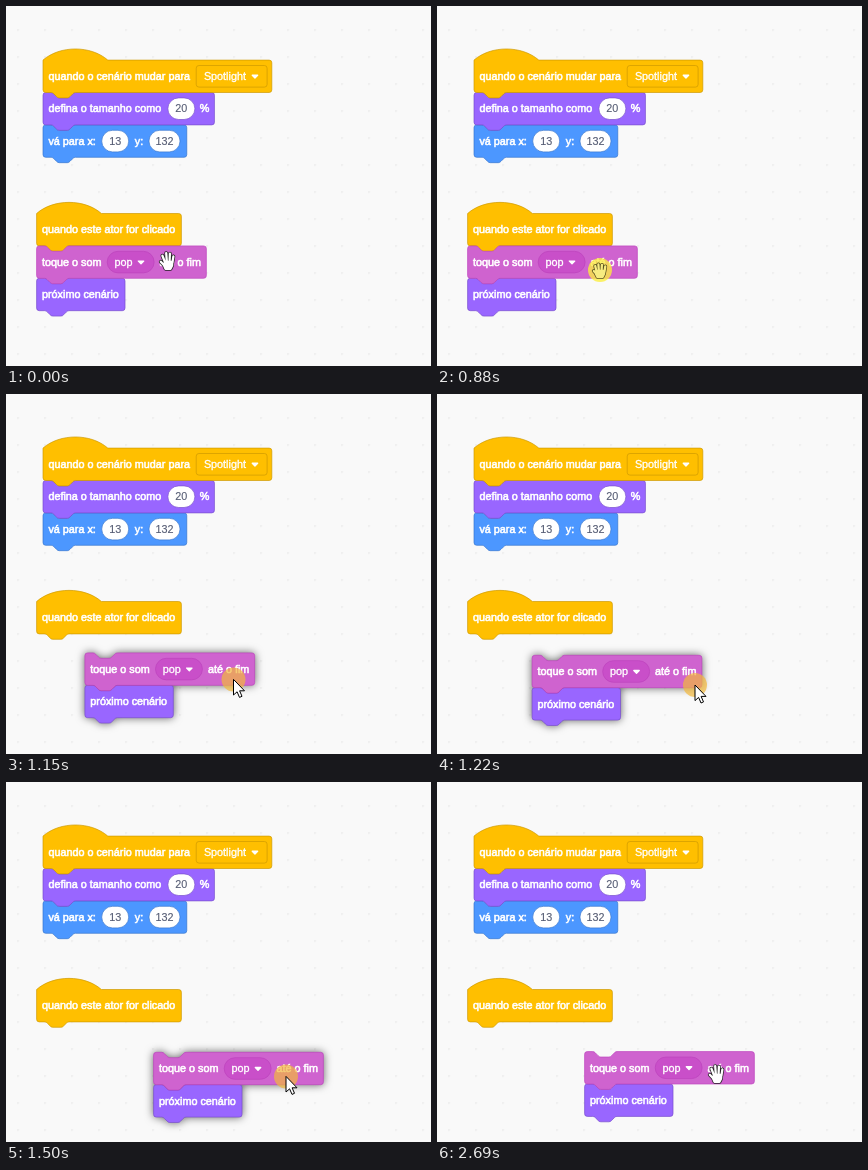
Animation, 425 px wide and 360 px high, one loop 3.55 s. Source, as an HTML page:

```html
<!DOCTYPE html>
<html lang="pt">
<head>
<meta charset="utf-8">
<title>Blocos</title>
<style>
  html, body { margin: 0; width: 100%; height: 100%; overflow: hidden; background: #f9f9f9; }
  svg { display: block; width: 425px; height: 360px; }
  text { font: 16px "Liberation Sans", Arial, sans-serif; fill: #fff; stroke: #fff; stroke-width: .9px; white-space: pre; }
  text.choice { stroke-width: .5px; }
  text.value { fill: #575e75; stroke: #575e75; stroke-width: .2px; text-anchor: middle; }
  .lifted { filter: drop-shadow(0 0 4px rgba(0, 0, 0, .6)); }
</style>
</head>
<body>
<svg viewBox="0 0 425 360">
  <defs>
    <pattern id="grid" x="11.3" y="23.3" width="27" height="27" patternUnits="userSpaceOnUse">
      <rect width="1.4" height="1.4" fill="#e4e4e4"/>
    </pattern>
  </defs>
  <rect width="425" height="360" fill="#f9f9f9"/>
  <rect width="425" height="360" fill="url(#grid)"/>
  <g id="fixed"></g>
  <g id="ghost" opacity=".28"></g>
  <g id="stack"></g>
  <circle id="halo" r="12"/>
  <g id="pointer">
    <path id="arrow" d="M0 0V15.6L3.6 12.4L6 18L8.5 16.9L6.1 11.4H11Z" fill="#fff" stroke="#000"/>
    <g id="open"></g>
    <g id="fist"></g>
  </g>
</svg>
<script>
const SCALE = 0.675, ROW = 48, LOOP = 3550;
const $ = id => document.getElementById(id);

const COLORS = {
  event: ['#ffbf00', '#cc9900', '#ffbf00'],
  looks: ['#9966ff', '#774dcb', '#855cd6'],
  motion: ['#4c97ff', '#3373cc', '#4280d7'],
  sound: ['#cf63cf', '#bd42bd', '#c94fc9']
};

// Block parts, in block units
const label = (x, s, style = '') => `<text class="${style}" x="${x}" y="29.6">${s}</text>`;
const box = (x, w, r, fill, stroke) =>
  `<rect x="${x}" y="8" width="${w}" height="32" rx="${r}" fill="${fill}" stroke="${stroke}"/>`;
const value = (x, w, s, kind) => box(x, w, 16, '#fff', COLORS[kind][1]) +
  label(x + w / 2, s, 'value');
const menu = (x, w, r, s, textX, arrowX, kind) => box(x, w, r, COLORS[kind][2], COLORS[kind][1]) +
  label(textX, s, 'choice') +
  `<path d="M${arrowX - 4} 22.5h8l-4 4z" fill="#fff" stroke="#fff" stroke-width="2" stroke-linejoin="round"/>`;

function outline(width, hat) {
  const top = hat
    ? 'M0 0c25-22 71-22 96 0'
    : 'M0 4A4 4 0 0 1 4 0H12c2 0 3 1 4 2l4 4c1 1 2 2 4 2h12c2 0 3-1 4-2l4-4c1-1 2-2 4-2';
  return `${top}H${width - 4}a4 4 0 0 1 4 4v40a4 4 0 0 1-4 4H48c-2 0-3 1-4 2l-4 4c-1 1-2 2-4 2` +
    'h-12c-2 0-3-1-4-2l-4-4c-1-1-2-2-4-2H4a4 4 0 0 1-4-4z';
}

function block(row, kind, width, parts, hat) {
  const [fill, stroke] = COLORS[kind];
  return `<g transform="translate(0 ${row * ROW})">` +
    `<path d="${outline(width, hat)}" fill="${fill}" stroke="${stroke}"/>${parts}</g>`;
}

const place = (x, y) => `translate(${x} ${y}) scale(${SCALE})`;
// Later rows go first so each tab overlaps the block below it
const script = (x, y, ...blocks) =>
  `<g transform="${place(x, y)}">${blocks.reverse().join('')}</g>`;

const HOME = { x: 30.6, y: 239.9 };
const SOUND_WIDTH = 251.5;

$('fixed').innerHTML =
  script(37, 54.1,
    block(0, 'event', 339, label(8, 'quando o cenário mudar para') +
      menu(227, 105, 4, 'Spotlight', 238.4, 314, 'event'), true),
    block(1, 'looks', 254, label(8, 'defina o tamanho como') +
      value(185, 40, '20', 'looks') + label(232.4, '%')),
    block(2, 'motion', 213, label(8, 'vá para x:') + value(87, 40, '13', 'motion') +
      label(136, 'y:') + value(157, 46, '132', 'motion'))) +
  script(HOME.x, HOME.y - ROW * SCALE,
    block(0, 'event', 214.5, label(8, 'quando este ator for clicado'), true));

$('ghost').innerHTML =
  `<path transform="${place(HOME.x, HOME.y)}" d="${outline(SOUND_WIDTH)}"/>`;

const soundBlock = block(0, 'sound', SOUND_WIDTH, label(8, 'toque o som') +
  menu(104.6, 69.5, 16, 'pop', 115.4, 154.7, 'sound') + label(182.2, 'até o fim'));
const nextBlock = block(1, 'looks', 131, label(8, 'próximo cenário'));
$('stack').innerHTML = script(0, 0, soundBlock, nextBlock);

function hand(fingers, palm, fill, edge) {
  const d = fingers + palm;
  const layer = (color, width) =>
    `<path d="${d}" fill="${color}" stroke="${color}" stroke-width="${width}" stroke-linecap="round" stroke-linejoin="round"/>`;
  return layer(edge, 3.8) + layer(fill, 2.3);
}
$('open').innerHTML = hand(
  'M-5.6-6L-3.2 0M-1.8-8.6L-1.2-1M1.9-8.2L1.6-1M5.4-5.5L4.4 1M-7.2 0L-3.5 4',
  'M-3 0L4.4 0L4 4L2.5 7H-2.5L-4 3.5Z', '#fff', '#222');
$('fist').innerHTML = hand(
  'M-4.8-4L-3.6 1M-1.6-5.5L-1.2 0M1.9-5.2L1.6 0M5.3-3.5L4.4 2M-6.2 1L-3.5 4',
  'M-3 1L4.4 1L4 4L2.5 7H-2.5L-4 4Z', '#f7ec80', '#57501c');

// time, pointer offset from the grab point, pointer shape, halo colour
const YELLOW = 'rgba(251, 238, 60, .78)', ORANGE = 'rgba(242, 184, 60, .7)', NONE = 'none';
const GRAB = { x: 163, y: 264 };
const STEPS = [
  [0, -1, -6.6, 'open', NONE],
  [70, -.8, -5.6],
  [140, -.5, -3.3],
  [210, -.2, -1.2],
  [280, 0, 0],
  [880, 0, 0, 'fist', YELLOW],
  [1010, 6, 3.1],
  [1080, 48.3, 19, 'arrow'],
  [1150, 64.5, 21.4, 'arrow', ORANGE],
  [1220, 95, 27],
  [1290, 102.5, 28],
  [1360, 112, 29.6],
  [1430, 117, 30.4],
  [1500, 117, 30.4],
  [2620, 117, 30.4, 'arrow', NONE],
  [2690, 117, 30.4, 'open']
];
const LIFT = 1080, DROP = 2690;

// Carry pointer shape and halo colour forward
let shape, halo;
const states = STEPS.map(([time, x, y, newShape = shape, newHalo = halo]) => {
  shape = newShape;
  halo = newHalo;
  return { time, x, y, shape, halo };
});

const show = (id, on) => $(id).setAttribute('visibility', on ? 'visible' : 'hidden');
const move = (id, x, y) => $(id).setAttribute('transform', `translate(${x} ${y})`);
let shown = -1;

function draw() {
  const t = performance.now() % LOOP;
  const i = states.findLastIndex(s => s.time <= t);
  if (i !== shown) {
    shown = i;
    const now = states[i];
    const x = GRAB.x + now.x, y = GRAB.y + now.y;
    const moved = now.time >= LIFT;
    // The dragged blocks trail the pointer by one step
    const drag = moved ? states[i - 1] : { x: 0, y: 0 };
    const settle = now.time >= DROP ? -.7 : 0;

    move('stack', HOME.x + drag.x, HOME.y + drag.y + settle);
    $('stack').classList.toggle('lifted', moved && now.time < DROP);
    move('pointer', x, now.shape === 'open' ? y - 1.6 : y);
    move('halo', x, y);
    $('halo').setAttribute('fill', now.halo);
    show('ghost', now.time === LIFT);
    ['arrow', 'open', 'fist'].forEach(id => show(id, id === now.shape));
  }
  requestAnimationFrame(draw);
}
draw();
</script>
</body>
</html>
```
